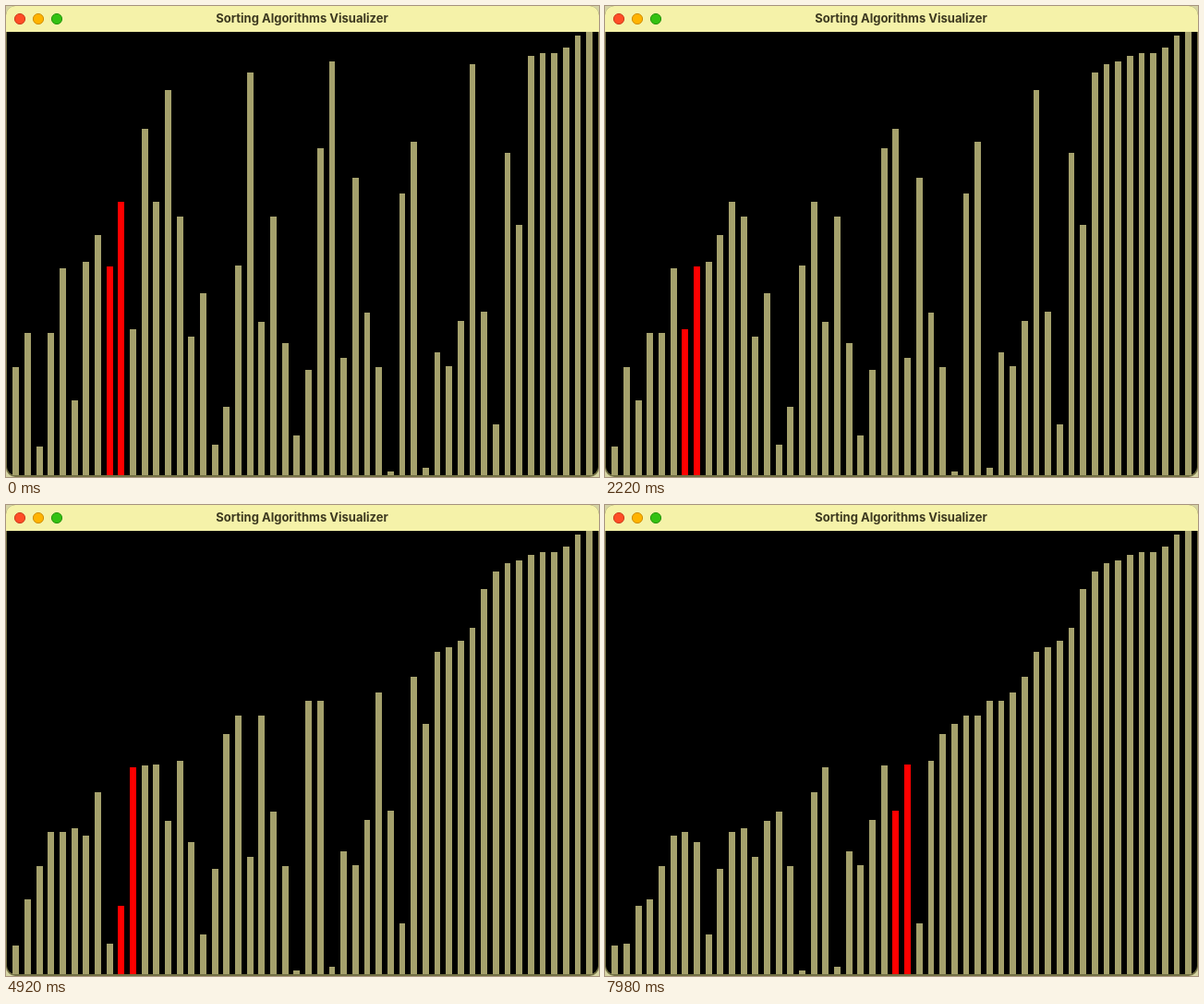
Animation, 642 px wide and 510 px high, one loop 8000 ms. Source, as an HTML page with a canvas:

```html
<!DOCTYPE html>
<html lang="en">
<head>
<meta charset="utf-8">
<title>Sorting Algorithms Visualizer</title>
<style>
  html, body { margin: 0; width: 100%; height: 100%; overflow: hidden; background: #d6d4a4; }
  canvas { display: block; }
</style>
</head>
<body>
<canvas id="stage" width="642" height="510"></canvas>
<script>
const ctx = document.getElementById('stage').getContext('2d');
const LOOP = 8000, FRAMES = 172, SWAPS_PER_FRAME = 2;
const FLOOR = 508, SLOT = 640 / 101;

// Top edge of each bar at the start; a smaller value is a taller bar.
const startTops = [
  391, 354, 477, 354, 284, 427, 277, 248, 282, 212,
  350, 133, 212, 91, 228, 358, 311, 475, 434, 281,
  72, 342, 228, 365, 465, 394, 154, 60, 381, 186,
  332, 391, 504, 203, 147, 500, 375, 390, 341, 63,
  331, 453, 159, 237, 54, 51, 51, 45, 32, 28
];

// Bubble sort that joins a running pass and reports every swap.
function* bubbleSort(tops, first) {
  yield first;
  for (let pass = 0, j = first + 1; pass < tops.length; pass++, j = 0) {
    for (; j < tops.length - 1; j++) {
      if (tops[j] < tops[j + 1]) {
        [tops[j], tops[j + 1]] = [tops[j + 1], tops[j]];
        yield j;
      }
    }
  }
}

function recordFrames() {
  const tops = startTops.slice(), frames = [];
  let swaps = 0;
  for (const active of bubbleSort(tops, 8)) {
    if (swaps++ % SWAPS_PER_FRAME === 0) frames.push({ tops: tops.slice(), active });
    if (frames.length === FRAMES) break;
  }
  return frames;
}

// Frames come in threes lasting 20, 100 and 20 ms.
function frameAt(time) {
  const phase = time % 140;
  return 3 * Math.floor(time / 140) + (phase >= 20) + (phase >= 120);
}

function roundRect(x, y, w, h, radii, color) {
  ctx.fillStyle = color;
  ctx.beginPath();
  ctx.roundRect(x, y, w, h, radii);
  ctx.fill();
}

function drawButton(x, fill, edge) {
  ctx.beginPath();
  ctx.arc(x, 14, 5.6, 0, 2 * Math.PI);
  ctx.fillStyle = fill;
  ctx.fill();
  ctx.strokeStyle = edge;
  ctx.lineWidth = 1;
  ctx.stroke();
}

function drawWindow() {
  ctx.clearRect(0, 0, 642, 510);
  roundRect(0, 0, 642, 510, 10, '#737044');
  roundRect(0, 0, 642, 28, [10, 10, 0, 0], '#f5f2a9');
  roundRect(1, 28, 640, FLOOR - 28, [0, 0, 9, 9], '#000');
  drawButton(15, '#ff4d26', '#cc3a1c');
  drawButton(35, '#ffb300', '#d08c00');
  drawButton(55, '#33c112', '#26930c');
  ctx.fillStyle = '#3d3920';
  ctx.font = '700 13px Inter, sans-serif';
  ctx.textAlign = 'center';
  ctx.fillText('Sorting Algorithms Visualizer', 320.5, 18);
}

function drawBars({ tops, active }) {
  tops.forEach((top, i) => {
    const x = 1 + SLOT * (2 * i + 1);
    const left = Math.round(x), right = Math.ceil(x + SLOT);
    ctx.fillStyle = i === active || i === active + 1 ? '#f00' : '#a5a16c';
    ctx.fillRect(left, top, right - left, FLOOR - top);
  });
}

const frames = recordFrames();

function render() {
  drawWindow();
  drawBars(frames[frameAt(performance.now() % LOOP)]);
  requestAnimationFrame(render);
}
render();
</script>
</body>
</html>
```
